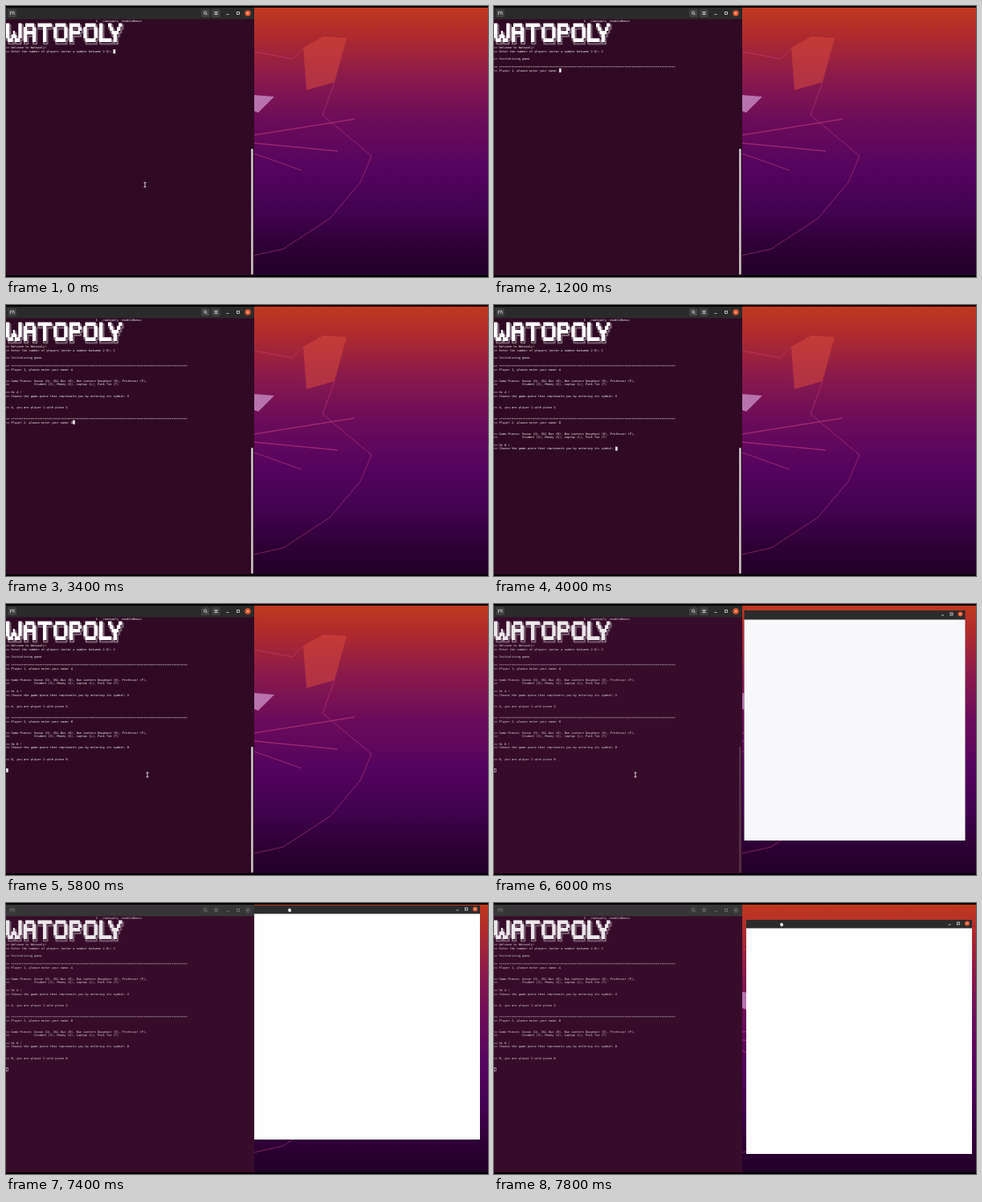
Recreate the animation shown at these times as an HTML page. Size 600 px wide and 338 px high, loop 8 s.

```html
<!DOCTYPE html>
<html lang="en">
<head>
<meta charset="utf-8">
<title>Watopoly</title>
<style>
  html, body { margin: 0; width: 100%; height: 100%; overflow: hidden; background: #000; }
  svg { display: block; width: 100%; height: 100%; }
  text { font-family: "DejaVu Sans Mono", monospace; font-size: 36.4px; fill: #f4f2f4; white-space: pre; text-rendering: geometricPrecision; }
</style>
</head>
<body>
<svg viewBox="0 0 600 338" preserveAspectRatio="none">
  <defs>
    <linearGradient id="sky" x1="0" y1="0" x2="0" y2="1">
      <stop offset="0" stop-color="#c0391f"/>
      <stop offset=".1" stop-color="#b02b2c"/>
      <stop offset=".26" stop-color="#8a1a4c"/>
      <stop offset=".42" stop-color="#6c0c5a"/>
      <stop offset=".6" stop-color="#55045f"/>
      <stop offset=".76" stop-color="#420250"/>
      <stop offset=".92" stop-color="#2a0030"/>
      <stop offset="1" stop-color="#22002a"/>
    </linearGradient>
  </defs>

  <g id="wallpaper">
    <rect x="309" y="2" width="291" height="334" fill="url(#sky)"/>
    <path d="M370 52 395 38 424 40 409 95 374 105Z" fill="#d84a3c" opacity=".55"/>
    <path d="M309 111 334 113 314 133 309 131Z" fill="#b873ad"/>
    <g fill="none" stroke="#c8407c" opacity=".55">
      <path d="M309 57 357 66 370 52M409 95 394 136 455 187 441 220 403 265 345 303 309 311"/>
      <path d="M309 161 434 141M309 171 413 181M309 184 368 205" stroke-width="1.3"/>
    </g>
  </g>

  <g id="terminal">
    <rect id="paper" y="16" width="309" height="320"/>
    <rect id="bar" y="2" width="309" height="14.5"/>
    <g id="controls">
      <g fill="#414041">
        <rect x="2.5" y="4" width="10.5" height="10" rx="1.5"/>
        <rect x="243" y="4" width="10.5" height="10" rx="1.5"/>
        <rect x="256" y="4" width="10.5" height="10" rx="1.5"/>
      </g>
      <g fill="none" stroke="#ddd" stroke-width=".8">
        <path d="M5.5 11V7.5H10V11M7 9.5H8.5M249.300 9.800 250.700 11.200M259.500 7.500H263.500M259.500 9H263.500M259.500 10.500H263.500M274.500 10.500H277.500"/>
        <circle cx="248" cy="8.600" r="1.600"/>
        <rect x="287.500" y="7.500" width="3" height="3"/>
      </g>
      <circle id="close" cx="301" cy="9" r="3.700"/>
      <path d="M300 8 302 10M302 8 300 10" stroke="#fff" stroke-width=".7"/>
    </g>
    <g id="banner" fill="#fff" stroke="#f4f2f4" stroke-width=".42"></g>
    <g id="lines"></g>
    <rect id="caret" width="2.2" height="4.5" stroke="#f0eef0" stroke-width=".5"/>
    <rect id="scroll" x="305.200" y="178" width="2.300" height="157" rx="1" fill="#dcd6da"/>
  </g>

  <g id="game">
    <rect id="frame" fill="#2c2b2c"/>
    <rect id="page"/>
    <g id="buttons">
      <path d="M-29.500 6H-26.500" stroke="#ddd" stroke-width=".8"/>
      <rect x="-18.500" y="3" width="3" height="3" fill="none" stroke="#ddd" stroke-width=".8"/>
      <circle cx="-6" cy="4.500" r="3" fill="#e2562c"/>
      <path d="M-7 3.500-5 5.500M-5 3.500-7 5.500" stroke="#fff" stroke-width=".6"/>
    </g>
  </g>

  <path id="beam" d="M-1.500-2.800H1.500M-1.500 2.800H1.500M0-2.800V2.800" stroke="#eee" stroke-width=".9"/>
  <path id="hand" d="M-2 0V-1.500H-1V-2.200H1V-1.500H2V1L1 2.300H-1Z" fill="#fff" stroke="#222" stroke-width=".3"/>
  <path d="M0 0H600V2H0ZM0 336H600V338H0Z" fill="#000"/>
</svg>

<script>
const LOOP = 8000, STEP = 200;
const COL = 2.19, ROW = 4.71, TOP = 16.75;
const $ = id => document.getElementById(id);

function add(parent, tag, attrs, text) {
  const node = document.createElementNS("http://www.w3.org/2000/svg", tag);
  set(node, attrs);
  if (text) node.textContent = text;
  parent.append(node);
  return node;
}
function set(node, attrs) {
  for (const key in attrs) node.setAttribute(key, attrs[key]);
}
const show = (node, on) => node.setAttribute("visibility", on ? "visible" : "hidden");

// Block letters with double-line shadows, one string per row.
const GLYPHS = {
  W: ["██╗    ██╗", "██║    ██║", "██║ █╗ ██║", "██║███╗██║", "╚███╔███╔╝", " ╚══╝╚══╝ "],
  A: [" █████╗ ", "██╔══██╗", "███████║", "██╔══██║", "██║  ██║", "╚═╝  ╚═╝"],
  T: ["████████╗", "╚══██╔══╝", "   ██║   ", "   ██║   ", "   ██║   ", "   ╚═╝   "],
  O: [" ██████╗ ", "██╔═══██╗", "██║   ██║", "██║   ██║", "╚██████╔╝", " ╚═════╝ "],
  P: ["██████╗ ", "██╔══██╗", "██████╔╝", "██╔═══╝ ", "██║     ", "╚═╝     "],
  L: ["██╗     ", "██║     ", "██║     ", "██║     ", "███████╗", "╚══════╝"],
  Y: ["██╗   ██╗", "╚██╗ ██╔╝", " ╚████╔╝ ", "  ╚██╔╝  ", "   ██║   ", "   ╚═╝   "]
};
const CORNERS = { "╔": [1, 1], "╗": [-1, 1], "╚": [1, -1], "╝": [-1, -1] };

function strokesFor(char, x, y) {
  const cx = x + COL / 2, cy = y + ROW / 2, gap = .5;
  if (char === "║") return `M${cx - gap} ${y}v${ROW}M${cx + gap} ${y}v${ROW}`;
  if (char === "═") return `M${x} ${cy - gap}h${COL}M${x} ${cy + gap}h${COL}`;
  const [h, v] = CORNERS[char];
  return [-gap, gap].map(d =>
    `M${cx + h * COL / 2} ${cy + v * d}H${cx + h * d}V${cy + v * ROW / 2}`).join("");
}

function drawBanner() {
  let blocks = "", strokes = "", col = 0;
  for (const letter of "WATOPOLY") {
    const rows = GLYPHS[letter];
    if (letter === "Y") col -= 3; // tucked in over the foot of the L
    rows.forEach((row, r) => [...row].forEach((char, c) => {
      const x = (col + c) * COL, y = TOP + (r + 1) * ROW;
      if (char === "█") blocks += `M${x} ${y}h${COL}v${ROW}h${-COL}z`;
      else if (char !== " ") strokes += strokesFor(char, x, y);
    }));
    col += rows[0].length;
  }
  add($("banner"), "path", { d: blocks, stroke: "none" });
  add($("banner"), "path", { d: strokes, fill: "none" });
}

const timed = [];
function print(time, row, text, col = 0) {
  const node = add($("lines"), "text", {
    transform: `translate(${col * COL} ${TOP + row * ROW + 3.6}) scale(.1)`
  }, text);
  timed.push({ time, node });
}

const PLAYERS = ">> Enter the number of players (enter a number between 2-8): ";
const NAME = n => `>> Player ${n}, please enter your name: `;
const SYMBOL = ">> Choose the game piece that represents you by entering its symbol: ";
const caretStops = [];
const caretAt = (time, row, col) => caretStops.push({ time, row, col });

function ask(time, row, prompt, typedAt, answer) {
  print(time, row, prompt);
  caretAt(time, row, prompt.length);
  print(typedAt, row, answer, prompt.length);
  caretAt(typedAt, row, prompt.length + 1);
}

function player(n, name, piece, row, [start, named, pieces, chosen, done]) {
  print(start, row, ">> " + "+".repeat(100));
  ask(start, row + 1, NAME(n), named, name);
  print(pieces, row + 4, ">> Game Pieces: Goose (G), QVL Bus (B), Bun Lantern Doughnut (D), Professor (P),");
  print(pieces, row + 5, ">>" + " ".repeat(14) + "Student (S), Money ($), Laptop (L), Pink Tie (T)");
  print(pieces, row + 7, `>> Hi ${name} !`);
  ask(pieces, row + 8, SYMBOL, chosen, piece);
  print(done, row + 11, `>> ${name}, you are player ${n} with piece ${piece}`);
}

drawBanner();
print(0, 0, "$  ./watopoly -enableBonus", 51);
print(0, 7, ">> Welcome to Watopoly!");
ask(0, 8, PLAYERS, 800, "2");
print(1200, 10, ">> Initializing game.");
player(1, "A", "G", 12, [1200, 1600, 1800, 2600, 2800]);
player(2, "B", "B", 26, [2800, 3400, 3800, 4600, 5200]);
caretAt(5200, 40, 0);

function drawTerminal(t) {
  const focused = t < 6000, lit = t < 6200;
  for (const { time, node } of timed) show(node, t >= time);
  const { row, col } = caretStops.filter(stop => t >= stop.time).pop();
  set($("caret"), {
    x: col * COL + .2, y: TOP + row * ROW + .1,
    fill: focused ? "#f0eef0" : "none"
  });
  set($("paper"), { fill: focused ? "#300a24" : "#370c2a" });
  set($("bar"), { fill: lit ? "#2b2a2b" : "#373537" });
  set($("controls"), { opacity: lit ? 1 : .4 });
  set($("close"), { fill: lit ? "#e2562c" : "#666" });
  set($("lines"), { opacity: focused ? 1 : .88 });
  set($("banner"), { opacity: focused ? 1 : .9 });
  set($("scroll"), { opacity: focused ? 1 : lit ? .2 : 0 });
}

function dragOffset(t) {
  const p = Math.min(1, Math.max(0, (t - 7400) / 400));
  return [5 * p, 18 * p];
}

function drawGame(t) {
  const open = t >= 6000, opening = t < 6200;
  show($("game"), open);
  const [dx, dy] = dragOffset(t);
  const box = opening ? { x: 311.5, y: 8, w: 275, h: 287 } : { x: 309 + dx, y: 3 + dy, w: 281, h: 292 };
  const bar = opening ? 11.5 : 10.5;
  set($("frame"), { x: box.x, y: box.y, width: box.w, height: box.h });
  set($("page"), {
    x: box.x, y: box.y + bar, width: box.w, height: box.h - bar,
    fill: opening ? "#f8f7f9" : "#fefefe"
  });
  set($("buttons"), { transform: `translate(${box.x + box.w} ${box.y})` });
}

function drawPointer(t) {
  let x = 173, y = 223;
  if (t >= 5400) {
    const p = Math.min(1, Math.max(0, (t - 6400) / 800));
    const ease = p * p * (3 - 2 * p);
    const [dx, dy] = dragOffset(t);
    x = 176 + 177 * ease + dx;
    y = 213 - 204 * ease + dy;
  }
  const visible = t < 800 || t >= 5400;
  for (const id of ["beam", "hand"]) {
    set($(id), { transform: `translate(${x} ${y})` });
    show($(id), visible && (id === "beam") === (x < 309));
  }
}

function tick() {
  const t = Math.floor(performance.now() % LOOP / STEP) * STEP;
  drawTerminal(t);
  drawGame(t);
  drawPointer(t);
  requestAnimationFrame(tick);
}
tick();
</script>
</body>
</html>
```
